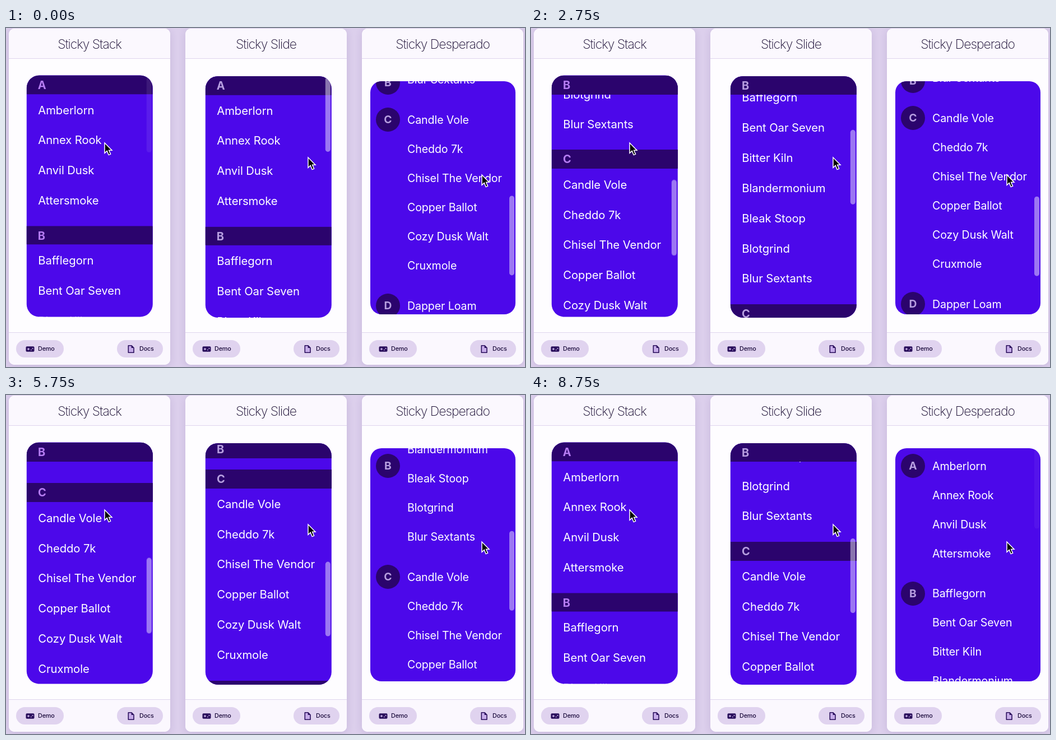
An HTML page for the animation above (9000 ms loop, 926 by 605 pixels).

```html
<!DOCTYPE html>
<html lang="en">
<head>
<meta charset="utf-8">
<title>Sticky lists</title>
<style>
  html, body { margin: 0; width: 100%; height: 100%; overflow: hidden; }
  body { position: relative; background: #dccfec; font-family: Inter, "Open Sans", sans-serif; }
  .card {
    position: absolute; top: 1px; width: 288px; height: 600px; border-radius: 10px;
    background: #fefdff; overflow: hidden; box-shadow: 0 3px 14px rgba(80, 50, 130, .14);
  }
  .bar { position: absolute; left: 0; right: 0; background: #fbf8fe; box-sizing: border-box; }
  .title {
    top: 0; height: 54px; border-bottom: 1px solid #dfd5ee; text-align: center;
    font-size: 23px; line-height: 56px; font-weight: 200; letter-spacing: -1.05px; color: #170a30;
  }
  .foot { bottom: 0; height: 58px; border-top: 1px solid #dfd5ee; }
  .pill {
    position: absolute; top: 13px; height: 31px; border-radius: 16px; background: #e0d3ef;
    font-size: 10.8px; line-height: 32px; font-weight: 500; letter-spacing: -.15px; color: #1b0b3c;
    box-sizing: border-box;
  }
  .demo { left: 13px; width: 85px; padding-left: 39px; }
  .docs { left: 193px; width: 82px; padding-left: 40px; }
  .pill svg { position: absolute; left: 17px; top: 8px; }
  .box { position: absolute; left: 0; top: 0; border-radius: 22.5px; overflow: hidden; background: #4c08ea; }
  .list { height: 100%; overflow: hidden; position: relative; }
  .row {
    height: 53.85px; line-height: 55px; padding-left: 20.5px; white-space: nowrap;
    font-size: 20.3px; font-weight: 430; letter-spacing: -.1px; color: #fff;
  }
  .row:last-child { margin-bottom: 20px; }
  .head {
    position: sticky; top: 0; height: 33.5px; line-height: 35.5px; padding-left: 20px;
    background: #2b046d; color: #b79fe0; font-size: 20px; font-weight: 700;
  }
  .stack section { display: contents; }
  .stack .head { color: #b57cf2; }
  .desperado { border-radius: 20px; }
  .desperado .list::before { content: ""; display: block; height: 5.5px; }
  .desperado .row { height: 52px; line-height: 52.5px; padding-left: 66px; font-size: 19.6px; }
  .desperado .row:last-child { margin-bottom: 19.7px; }
  .desperado .head {
    float: left; top: 10px; width: 43px; height: 43px; margin: 4.5px 0 0 10px; padding: 0;
    border-radius: 50%; line-height: 43px; text-align: center; font-size: 19.3px;
  }
  .thumb { position: absolute; right: 2.5px; top: 0; width: 9px; border-radius: 4.5px; background: rgba(255, 255, 255, .45); }
  .cursor { position: absolute; overflow: visible; }
</style>
</head>
<body>
<script>
const LOOP = 9000, STEP = 250;

const groups = {
  A: ["Amberlorn", "Annex Rook", "Anvil Dusk", "Attersmoke"],
  B: ["Bafflegorn", "Bent Oar Seven", "Bitter Kiln", "Blandermonium", "Bleak Stoop", "Blotgrind", "Blur Sextants"],
  C: ["Candle Vole", "Cheddo 7k", "Chisel The Vendor", "Copper Ballot", "Cozy Dusk Walt", "Cruxmole"],
  D: ["Dapper Loam", "Dell Fern", "Dim Parcel", "Dusty Ovens"]
};

// scroll and fade: [time, value] keys; thumb: [top, height, scroll px per thumb px]
const panels = [
  {
    name: "Stack", x: 5, box: [36.8, 84.5, 225, 431], cursor: [175.5, 205], thumb: [2.5, 134.5, 3.076],
    scroll: [[0, 0], [2000, 434], [3750, 667], [4750, 639], [6500, 612], [7500, 0], [9000, 0]],
    fade: [[0, .18], [250, 1], [7750, 1], [8500, 0], [9000, 0]]
  },
  {
    name: "Slide", x: 320, box: [355.8, 85.9, 225, 431], cursor: [538.5, 230.5], thumb: [2, 133, 3.11],
    scroll: [[0, 0], [2000, 143], [3750, 538], [4750, 686], [6500, 630], [7750, 756], [8750, 523], [9000, 465]],
    fade: [[0, 1], [9000, 1]]
  },
  {
    name: "Desperado", x: 635, box: [650, 95, 259, 415.5], cursor: [849, 261.5], thumb: [1.6, 142, 2.83],
    scroll: [[0, 574], [2000, 627], [3750, 428], [4750, 173], [6500, 570], [7750, 38], [8000, 0], [9000, 0]],
    fade: [[0, 1], [8000, 1], [8750, .1], [9000, 0]]
  }
];

const demoIcon = `<svg width="16" height="16"><rect x=".5" y="3.3" width="15" height="9.4" rx="1.8" fill="#2a0f5c"/>
  <path d="M3 8h4M5 6v4" stroke="#cbb4ea" stroke-width="1.3"/>
  <path d="M9 9.5h1.6M11.6 6.8h1.8" stroke="#cbb4ea" stroke-width="1.7"/></svg>`;
const docsIcon = `<svg width="16" height="16"><path d="M3.3 1.7H9l4 4v8.6H3.3Z" fill="#c6abe9" stroke="#2a0f5c" stroke-width="1.6" stroke-linejoin="round"/>
  <path d="M8.6 1.7v4.4H13Z" fill="#2a0f5c"/></svg>`;

const sections = Object.entries(groups).map(([letter, names]) =>
  `<section><div class="head">${letter}</div>${names.map(n => `<div class="row">${n}</div>`).join("")}</section>`
).join("");

function add(html) {
  document.body.insertAdjacentHTML("beforeend", html);
  return document.body.lastElementChild;
}

for (const p of panels) {
  const [x, y, w, h] = p.box;
  add(`<div class="card" style="left:${p.x}px">
    <div class="bar title">Sticky ${p.name}</div>
    <div class="bar foot"><div class="pill demo">${demoIcon}Demo</div><div class="pill docs">${docsIcon}Docs</div></div>
  </div>`);
  // A transform keeps the fractional position that left/top would snap.
  const box = add(`<div class="box ${p.name.toLowerCase()}" style="transform:translate(${x}px,${y}px);width:${w}px;height:${h}px">
    <div class="list">${sections}</div><div class="thumb" style="height:${p.thumb[1]}px"></div></div>`);
  p.list = box.querySelector(".list");
  p.bar = box.querySelector(".thumb");
  add(`<svg class="cursor" width="14" height="23" style="left:${p.cursor[0]}px;top:${p.cursor[1]}px">
    <path d="M0 0V18.3L4.2 14.4 7.2 21.6 10.6 20.2 7.6 13.2H13Z" fill="#000" stroke="#fff" stroke-width="1.5"/></svg>`);
}

// Monotone cubic through the keys: never overshoots, eases at turning points.
function track(keys, t) {
  const secant = i => (keys[i + 1][1] - keys[i][1]) / (keys[i + 1][0] - keys[i][0]);
  const slope = i => {
    if (i === 0) return secant(0);
    if (i === keys.length - 1) return secant(i - 1);
    const a = secant(i - 1), b = secant(i);
    return a * b <= 0 ? 0 : 2 * a * b / (a + b);
  };
  let i = 0;
  while (i < keys.length - 2 && t >= keys[i + 1][0]) i++;
  const [t0, v0] = keys[i], [t1, v1] = keys[i + 1];
  const d = t1 - t0, u = (t - t0) / d, r = 1 - u;
  return r * r * (1 + 2 * u) * v0 + u * u * (3 - 2 * u) * v1
    + d * u * r * (r * slope(i) - u * slope(i + 1));
}

function draw() {
  const t = Math.floor(performance.now() % LOOP / STEP) * STEP;
  for (const p of panels) {
    const scroll = track(p.scroll, t), [top, , ratio] = p.thumb;
    p.list.scrollTop = scroll;
    p.bar.style.transform = `translateY(${top + scroll / ratio}px)`;
    p.bar.style.opacity = track(p.fade, t);
  }
  requestAnimationFrame(draw);
}
draw();
</script>
</body>
</html>
```
